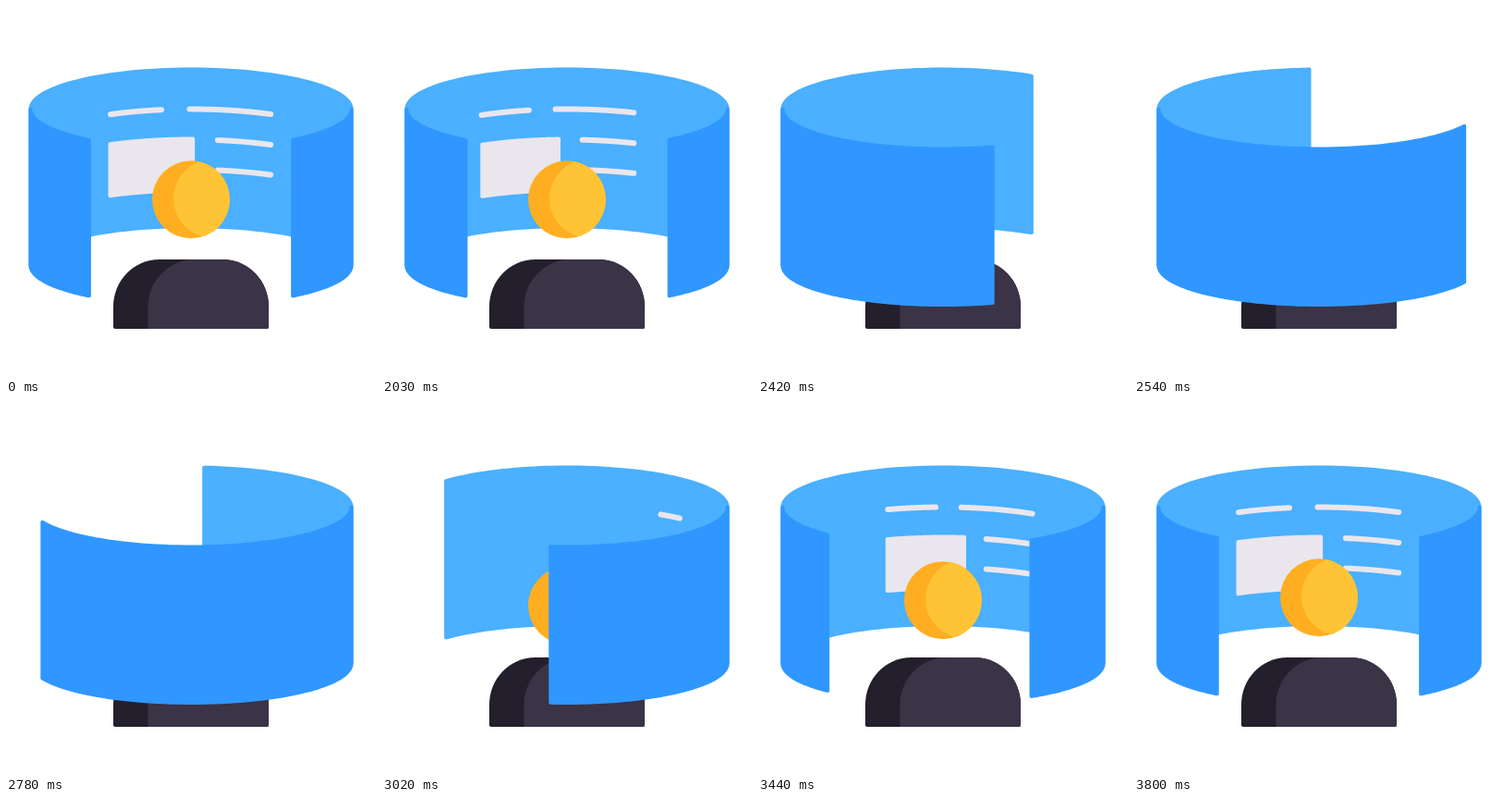
An HTML page with a canvas for the animation above (3.83 s loop, 400 by 400 pixels).

```html
<!DOCTYPE html>
<html lang="en">
<head>
<meta charset="utf-8">
<title>Panoramic screen</title>
<style>
html, body { margin: 0; width: 100%; height: 100%; overflow: hidden; background: #fff; }
canvas { display: block; width: 400px; height: 400px; }
</style>
</head>
<body>
<canvas width="400" height="400"></canvas>
<script>
const ctx = document.querySelector('canvas').getContext('2d');
const LOOP = 3830, REST = 2030, STEP = 30, LAST = 60;
const CX = 200, RX = 175.5, RY = 43, TOP = 109.5, BOTTOM = 282.5;
const HALF_GAP = 112, RAD = Math.PI / 180;
const INNER = '#4ab0ff', OUTER = '#2f97ff', PAPER = '#eae6ee';

// Turn progress: [step, value, slope]
const TURN = [[0, 0, 0], [9, .08, .02], [18, .365, .036], [34, .827, .019], [48, .98, .0045], [60, 1, 0]];

// Marks on the inner wall: [from angle, to angle, offset below the rim]
const LINES = [[-29.7, -10.5, 45], [-.5, 29.4, 45], [9.5, 29.4, 78], [9.5, 29.4, 110.5]];

const BODY_END = 'H234C262 274 284 297 284 325V347Q284 349 282 349';
const body = new Path2D('M116 325C116 297 138 274 166 274' + BODY_END + 'H118Q116 349 116 347Z');
const bodyFront = new Path2D('M153.5 349V325C153.5 297 176 274 204 274' + BODY_END + 'Z');

const smooth = t => t * t * (3 - 2 * t);

function turnAt(k) {
  const i = Math.max(1, TURN.findIndex(p => k <= p[0]));
  const [k0, a, m0] = TURN[i - 1], [k1, b, m1] = TURN[i];
  const d = k1 - k0, t = (k - k0) / d, u = 1 - t;
  return a + (b - a) * smooth(t) + d * (m0 * t * u * u - m1 * t * t * u);
}

// Angle on the rim after walking a given length from its front point
function rimAngle(length) {
  const da = .004 * Math.sign(length);
  let left = Math.abs(length), a = 0;
  while (left > 0) {
    const ds = Math.hypot(RX * Math.cos(a), RY * Math.sin(a)) * .004;
    a += da * Math.min(1, left / ds);
    left -= ds;
  }
  return a;
}

const CIRCUMFERENCE = (() => {
  let sum = 0;
  for (let a = 0; a < 360; a++) sum += Math.hypot(RX * Math.cos(a * RAD), RY * Math.sin(a * RAD)) * RAD;
  return sum;
})();

function arc(from, to, rx, ry, y) {
  const n = 60;
  for (let i = 0; i <= n; i++) {
    const a = from + (to - from) * i / n;
    ctx.lineTo(CX + rx * Math.sin(a), y + ry * Math.cos(a));
  }
}

function ribbon(from, to, color, rx, topY, bottomY, bottomRy, soft) {
  ctx.beginPath();
  arc(from, to, rx, RY, topY);
  arc(to, from, rx, bottomRy, bottomY);
  ctx.closePath();
  ctx.fillStyle = ctx.strokeStyle = color;
  ctx.lineWidth = soft;
  ctx.fill();
  ctx.stroke();
}

// The part of the wall between two angles that lies in the front or back half
function wall(from, to, first, color) {
  for (let turn = -1; turn <= 2; turn++) {
    const start = first + turn * 2 * Math.PI;
    const a = Math.max(from, start), b = Math.min(to, start + Math.PI);
    if (a < b) ribbon(a, b, color, RX - 2, TOP + 2, BOTTOM - 2, 42.5, 4);
  }
}

function marks(k) {
  const shift = k < 22 ? -(3.19 * k + .41 * k * k) : 62 * ((LAST - k) / 26) ** 2.84;
  const scale = Math.max(.9, 1 - Math.abs(shift) / 70);
  const place = (a, low) => Math.min(44, Math.max(low, a * scale + shift));

  const from = place(-29.9, -31.5), to = place(.7, -31.5);
  if (from < to) {
    ribbon((180 - from) * RAD, (180 - to) * RAD, PAPER, RX, TOP + 77, TOP + 133, RY, 4);
  }
  ctx.strokeStyle = PAPER;
  ctx.lineWidth = 6;
  for (const [a, b, drop] of LINES) {
    const p = place(a, -50), q = place(b, -50);
    if (p >= q) continue;
    ctx.beginPath();
    arc((180 - p) * RAD, (180 - q) * RAD, RX, RY, TOP + drop);
    ctx.stroke();
  }
}

function disc(x, y, r) {
  ctx.beginPath();
  ctx.arc(x, y, r, 0, 2 * Math.PI);
}

function person(k) {
  const bob = 9.8 * smooth(k < 27 ? k / 27 : (LAST - k) / 33);
  ctx.save();
  ctx.translate(0, bob);
  disc(CX, 209.2, 42);
  ctx.fillStyle = '#ffae21';
  ctx.fill();
  ctx.clip();
  disc(223.5, 208, 42.5);
  ctx.fillStyle = '#ffc436';
  ctx.fill();
  ctx.restore();
  ctx.fillStyle = '#241f2c';
  ctx.fill(body);
  ctx.fillStyle = '#3b3346';
  ctx.fill(bodyFront);
}

function draw(now) {
  const t = now % LOOP;
  const k = t < REST ? 0 : Math.min(LAST, Math.floor((t - REST) / STEP) + 1);
  const middle = turnAt(k) * CIRCUMFERENCE;
  const from = rimAngle(middle + HALF_GAP);
  const to = rimAngle(middle - HALF_GAP) + 2 * Math.PI;

  ctx.fillStyle = '#fff';
  ctx.fillRect(0, 0, 400, 400);
  ctx.lineCap = ctx.lineJoin = 'round';
  wall(from, to, Math.PI / 2, INNER);
  marks(k);
  person(k);
  wall(from, to, -Math.PI / 2, OUTER);
}

const begin = performance.now();
function frame() {
  draw(performance.now() - begin);
  requestAnimationFrame(frame);
}
frame();
</script>
</body>
</html>
```
